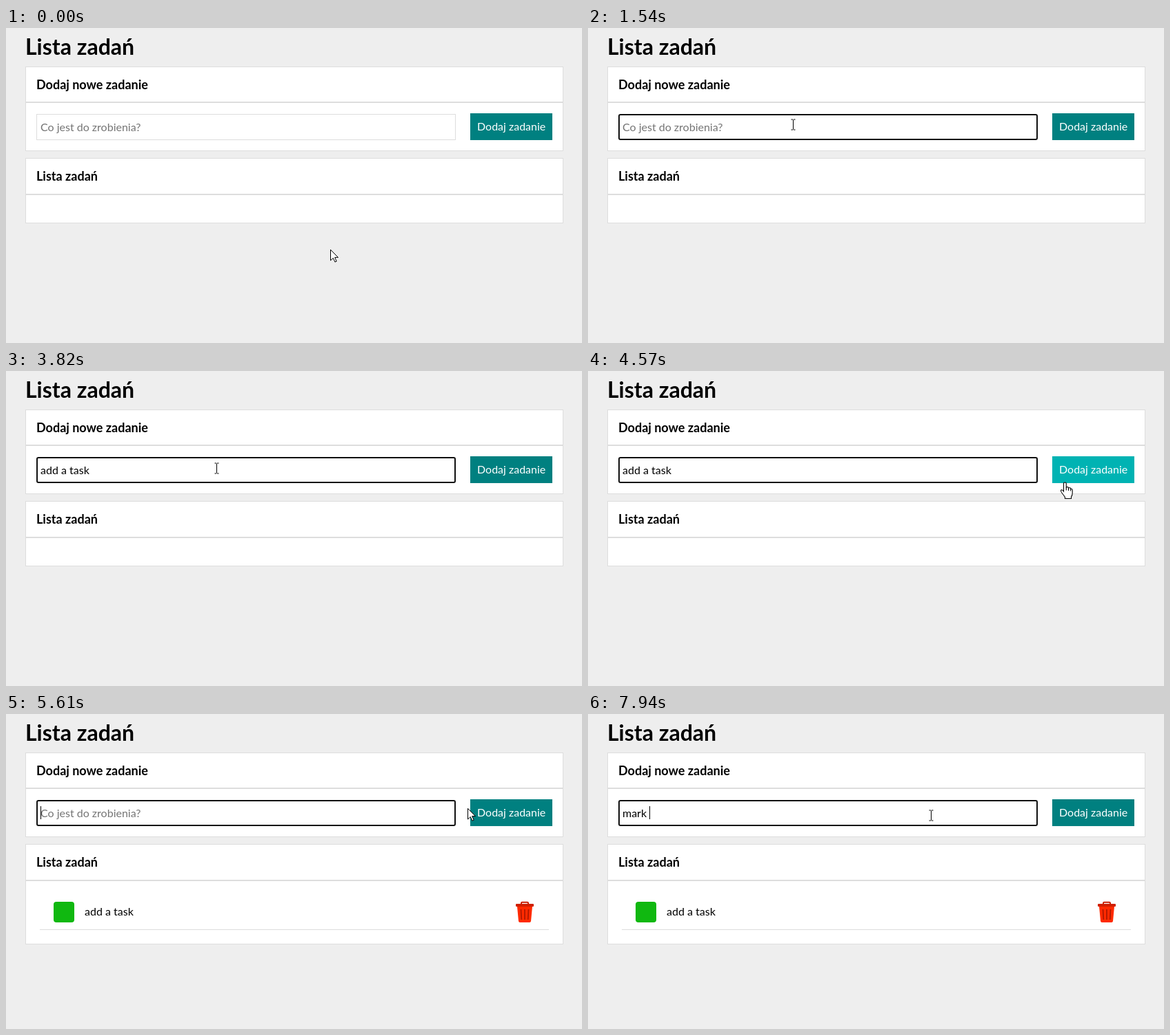
Recreate the animation shown at these times as an HTML page. Size 835x458 px, loop 8000 ms.

```html
<!DOCTYPE html>
<html lang="pl">
<head>
<meta charset="utf-8">
<title>Lista zadań</title>
<style>
html, body { margin: 0; width: 100%; height: 100%; overflow: hidden; background: #eee; }
svg { display: block; width: 835px; height: 458px; font: 16px Lato, sans-serif; }
text { white-space: pre; }
.box { fill: #fff; stroke: #ddd; }
.h1 { font-size: 32px; font-weight: 700; }
.h2 { font-size: 18px; font-weight: 700; }
.hint { fill: #757575; }
</style>
</head>
<body>
<svg viewBox="0 0 835 458">
  <rect width="835" height="458" fill="#eee"/>
  <text class="h1" x="28" y="39">Lista zadań</text>

  <rect class="box" x="28.5" y="56.5" width="779" height="51"/>
  <rect class="box" x="28.5" y="108.5" width="779" height="70"/>
  <text class="h2" x="44" y="89">Dodaj nowe zadanie</text>
  <rect id="field"/>
  <text id="hint" class="hint" x="50" y="150">Co jest do zrobienia?</text>
  <text id="typed" x="50" y="150"></text>
  <rect id="caret" y="134" width="1" height="19"/>
  <rect id="button" x="673" y="124" width="119" height="39"/>
  <text x="683" y="149" fill="#fff">Dodaj zadanie</text>

  <rect class="box" x="28.5" y="189.5" width="779" height="52"/>
  <rect id="list" class="box" x="28.5" y="242.5" width="779"/>
  <text class="h2" x="44" y="222">Lista zadań</text>

  <g id="task">
    <rect x="69" y="273" width="30" height="30" rx="4" fill="#10b810"/>
    <text x="114" y="293">add a task</text>
    <rect x="49" y="313" width="738" height="1" fill="#ddd"/>
    <path d="M747 277v-2q0-1.200 1.200-1.200h7.600q1.200 0 1.200 1.200v2" fill="none" stroke="#c81e00" stroke-width="2"/>
    <path d="M741 280h22l-2 21q-.2 2-2 2h-14q-1.800 0-2-2z" fill="#ff2a00"/>
    <rect x="739" y="276" width="26" height="4" rx="1" fill="#d02000"/>
    <path d="M746.500 284l.8 15M752 284v15M757.500 284l-.8 15" stroke="#b01800" stroke-width="1.800" fill="none"/>
  </g>

  <circle id="click" r="12" fill="#ffff80"/>
  <g id="pointer">
    <path id="beam" d="M-3 -7.500h2.500M.5 -7.500H3M-3 7.500h2.500M.5 7.500H3M0 -7V7" stroke="#000" fill="none"/>
    <path id="arrow" d="M0 .8V16.500L3.800 13L6.400 18.700L8.700 17.700L6.200 12.100H11Z" fill="#fff" stroke="#000"/>
    <g id="hand" fill="#fff" stroke="#000" stroke-width="1.100">
      <path d="M-2 13V2Q-2 .5 -.2 .5Q1.800 .5 1.800 2V7.500Q4.800 6.500 5 8.500Q8 7.500 8.200 9.800Q10.700 9.300 10.700 12V16Q10.700 19 9 21.500V24H0V22Q-1.500 19.500 -4 16.500Q-7 12.800 -5.500 11.500Q-4 10.500 -2 13.500Z"/>
      <path d="M1.800 7.500V12M5 8.500V12.500M8.200 9.800V13" fill="none"/>
    </g>
  </g>
</svg>
<script>
const LOOP = 8000, ADDED = 5250, FOCUS = 1010;
const el = id => document.getElementById(id);
const set = (id, attrs) => { for (const k in attrs) el(id).setAttribute(k, attrs[k]); };
const show = (id, on) => { el(id).style.display = on ? "" : "none"; };

// start, end, from, bend, to
const moves = [
  [0, 680, [470, 321], [360, 240], [297, 140]],
  [3760, 4570, [297, 140], [560, 185], [691, 161]],
  [4570, 5120, [691, 161], [712, 150], [731, 148]],
  [5250, 6220, [731, 148], [640, 120], [497, 147]]
];
// text and the time of each key
const words = [
  ["add a task", [1810, 1870, 2020, 2150, 2270, 2420, 2550, 2690, 2750, 2890], ADDED],
  ["mark ", [7400, 7470, 7610, 7740, 7940], LOOP]
];
const clicks = [[1010, 1080], [5180, 5250], [6480, 6610]];
const blinks = [1540, 1810, 3420, 3920, 4420, 4920, 5770, 6290, 6810, 7340];

function pointerAt(t) {
  const [a, b, p, c, q] = moves.filter(m => t >= m[0]).pop();
  const u = Math.min(1, (t - a) / (b - a)), s = u * u * (3 - 2 * u), r = 1 - s;
  return [0, 1].map(i => r * r * p[i] + 2 * r * s * c[i] + s * s * q[i]);
}

function typedAt(t) {
  for (const [text, keys, end] of words)
    if (t >= keys[0] && t < end) return text.slice(0, keys.filter(k => t >= k).length);
  return "";
}

const inside = ([x, y], l, t, r, b) => x >= l && x < r && y >= t && y < b;

function draw(t) {
  const p = pointerAt(t), text = typedAt(t), focus = t >= FOCUS, added = t >= ADDED;
  const onField = inside(p, 44, 125, 652, 163), onButton = inside(p, 673, 124, 792, 163);

  set("field", focus
    ? { x: 45, y: 126, width: 606, height: 36, rx: 2, fill: "#fff", stroke: "#101010", "stroke-width": 2 }
    : { x: 44.5, y: 125.5, width: 607, height: 37, rx: 0, fill: "#fff", stroke: "#ddd", "stroke-width": 1 });
  show("hint", !text);
  el("typed").textContent = text;
  const width = text ? el("typed").getComputedTextLength() : 0;
  set("caret", { x: 50 + Math.round(width) });
  show("caret", focus && blinks.filter(b => t >= b).length % 2 === 0);

  set("button", { fill: onButton ? "#00b3b3" : "#008080" });
  set("list", { height: added ? 92 : 41 });
  show("task", added);

  set("click", { cx: p[0] - 2, cy: p[1] - 1 });
  show("click", clicks.some(([a, b]) => t >= a && t < b));
  set("pointer", { transform: `translate(${Math.round(p[0]) + .5} ${Math.round(p[1]) + .5})` });
  show("beam", onField);
  show("hand", onButton);
  show("arrow", !onField && !onButton);
}

const start = performance.now();
function frame() {
  draw((performance.now() - start) % LOOP);
  requestAnimationFrame(frame);
}
frame();
</script>
</body>
</html>
```
